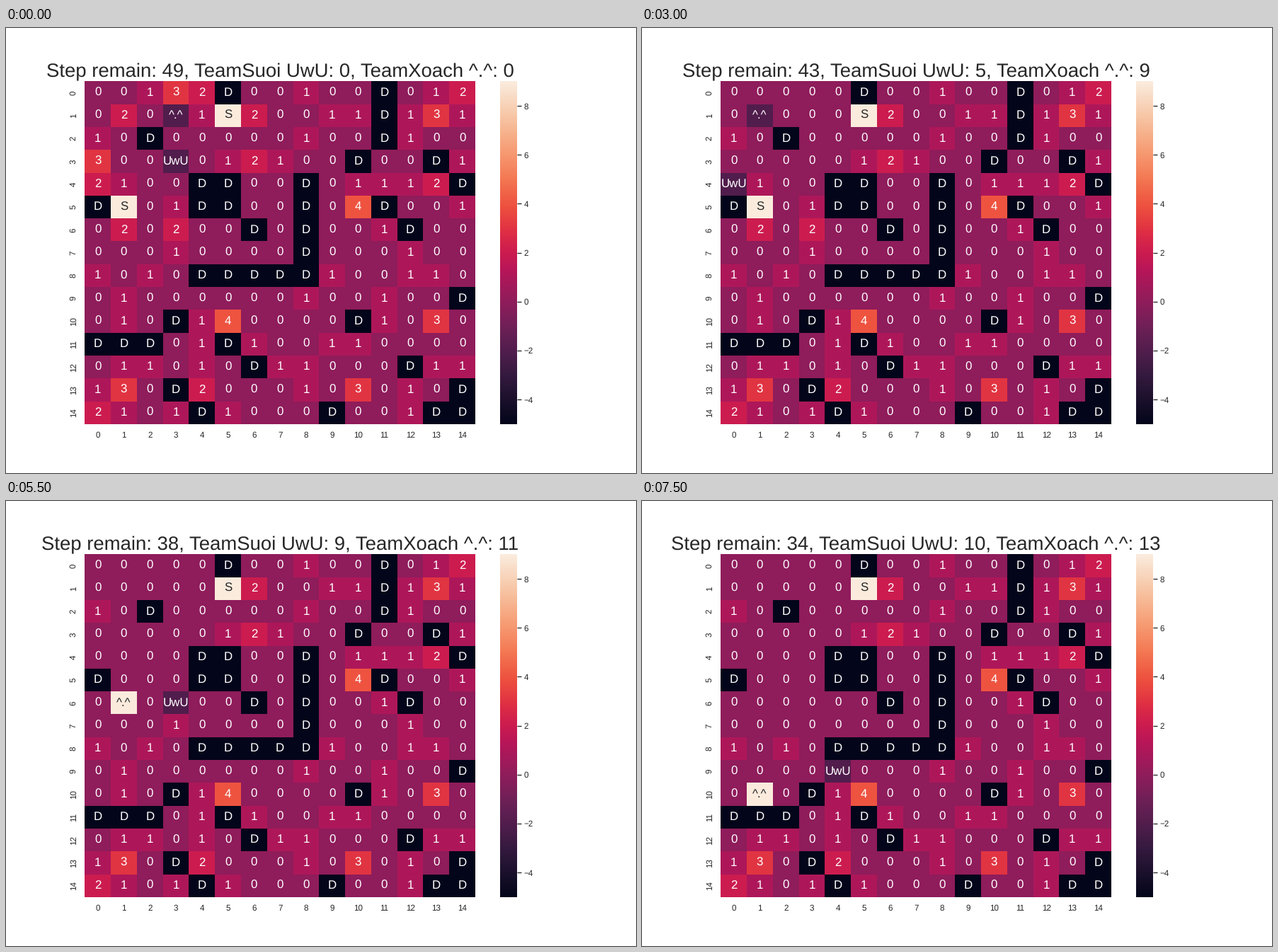
Animation, 890 px wide and 629 px high, one loop 8000 ms. Source, as a matplotlib script:

```python
import matplotlib.pyplot as plt
import numpy as np
from matplotlib.animation import FuncAnimation
from matplotlib.colors import LinearSegmentedColormap

plt.rcParams["font.family"] = "Liberation Sans"
plt.rcParams["text.hinting"] = "none"

DPI = 76.07
INK = "#262626"
FLOOR = [
    "00132D00100D012",
    "02001S20011D131",
    "10D00000100D100",
    "3000012100D00D1",
    "2100DD00D01112D",
    "DS01DD00D04D001",
    "020200D0D001D00",
    "00010000D000100",
    "1010DDDDD100110",
    "01000000100100D",
    "010D140000D1030",
    "DDD01D100110000",
    "011010D11000D11",
    "130D20001030" "10D",
    "2101D1000D001DD",
]
SIZE = len(FLOOR)
DANGER, SHIELD, PLAYER = -5, 9, -2
STEP = {"U": (-1, 0), "D": (1, 0), "L": (0, -1), "R": (0, 1)}
# face, start cell, moves
PLAYERS = [
    ("UwU", (3, 3), "UDLLLDRRRDDDDDR"),
    ("^.^", (1, 3), "RULLL" + "D" * 10),
]
FRAMES = 16

ramp = [
    (0, "#03051a"), (1 / 11, "#221331"), (1 / 7, "#35193e"),
    (2 / 11, "#451c47"), (3 / 11, "#691f55"), (2 / 7, "#701f57"),
    (4 / 11, "#921c5b"), (3 / 7, "#ad1759"), (5 / 11, "#b91657"),
    (1 / 2, "#cb1b4f"), (6 / 11, "#d92847"), (4 / 7, "#e13342"),
    (7 / 11, "#ed503e"), (5 / 7, "#f37651"), (8 / 11, "#f47d57"),
    (9 / 11, "#f6a47c"), (6 / 7, "#f6b48f"), (10 / 11, "#f7c9aa"),
    (1, "#faebdd"),
]
cmap = LinearSegmentedColormap.from_list("ember", ramp, N=256)


def play(turns):
    """Return cell values, cell labels and scores after some turns."""
    labels = [list(row) for row in FLOOR]
    cells = [start for _, start, _ in PLAYERS]
    scores = [0, 0]
    powers = [PLAYER, PLAYER]
    for t in range(turns):
        for p, (_, _, moves) in enumerate(PLAYERS):
            dr, dc = STEP[moves[t]]
            r, c = cells[p] = cells[p][0] + dr, cells[p][1] + dc
            if labels[r][c] == "S":
                powers[p] = SHIELD
            else:
                scores[p] += int(labels[r][c])
            labels[r][c] = "0"
    code = {"D": DANGER, "S": SHIELD}
    values = np.array([[code.get(s) or int(s) for s in row] for row in labels])
    for (face, _, _), (r, c), power in zip(PLAYERS, cells, powers):
        labels[r][c] = face
        values[r, c] = power
    return values, labels, scores


# the small surplus keeps the pixel size from rounding down
fig, ax = plt.subplots(figsize=(890.01 / DPI, 629.01 / DPI), dpi=DPI)
fig.subplots_adjust(left=0.125, right=0.9, bottom=0.11, top=0.88)

mesh = ax.pcolormesh(np.zeros((SIZE, SIZE)), cmap=cmap, vmin=DANGER, vmax=SHIELD)
ax.set(xlim=(0, SIZE), ylim=(SIZE, 0))
ax.spines[:].set_visible(False)
mids = np.arange(SIZE) + 0.5
ax.set_xticks(mids, range(SIZE))
ax.set_yticks(mids, range(SIZE), rotation=90, va="center")
ax.tick_params(length=0, pad=9.5, labelsize=11, labelcolor=INK)

bar = fig.colorbar(mesh, ax=ax)
bar.outline.set_linewidth(0)
bar.ax.tick_params(length=6, width=1.25, pad=3.5, color=INK,
                   labelsize=11, labelcolor=INK)

title = ax.set_title("", fontsize=26, color=INK, pad=6)
notes = [[ax.text(x, y, "", ha="center", va="center", fontsize=16)
          for x in mids] for y in mids]


def update(i):
    values, labels, (first, second) = play(i)
    mesh.set_array(values)
    title.set_text(f"Step remain: {49 - i}, TeamSuoi UwU: {first}, "
                   f"TeamXoach ^.^: {second}")
    for r in range(SIZE):
        for c in range(SIZE):
            notes[r][c].set_text(labels[r][c])
            notes[r][c].set_color(INK if values[r, c] == SHIELD else "white")
    return [mesh, title]


anim = FuncAnimation(fig, update, frames=FRAMES, interval=500,
                     repeat=True, repeat_delay=0, blit=False)
plt.show()
```
